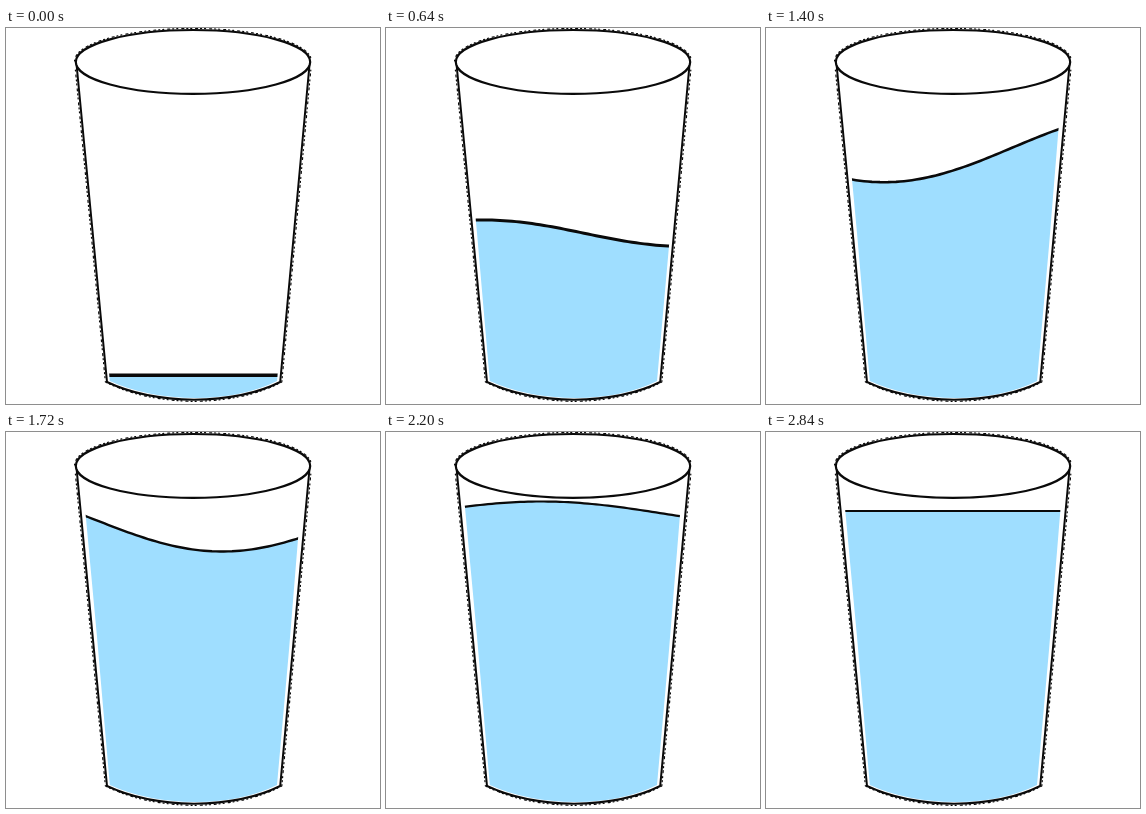
Write an HTML page that moves like this. It is 374 by 376 pixels and loops after 2880 ms.

```html
<!DOCTYPE html>
<html lang="en">
<head>
<meta charset="utf-8">
<title>Filling glass</title>
<style>
  html, body { margin: 0; width: 100%; height: 100%; overflow: hidden; background: #fff; }
  svg { display: block; width: 100%; height: 100%; }
  .ink { fill: none; stroke: #0a0a0a; stroke-linecap: round; stroke-linejoin: round; }
</style>
</head>
<body>
<svg viewBox="0 0 374 376">
  <clipPath id="inside">
    <path d="M75 32 L79.3 79 L91 205 L103.8 353 Q140 369.5 190 370 Q238 369.5 271 353 L283 218 L294.3 79 L298 32 Z"/>
  </clipPath>
  <g clip-path="url(#inside)">
    <path id="water" fill="#9fdeff"/>
    <path id="surface" class="ink"/>
  </g>
  <g class="ink" stroke-width="2">
    <ellipse cx="187" cy="33.9" rx="117.2" ry="31.9" stroke-width="2.2"/>
    <path d="M70.7 38 L101 354 Q137 371 188 371.8 Q240 371 274.2 354 L303.4 38"/>
  </g>
  <g class="ink" stroke-width="1.2" stroke-dasharray="1 4 2 3 1 3">
    <path d="M69.4 42 L99.4 354 Q136 372.5 188 373.4 Q241 372.5 275.8 354 L304.8 42"/>
    <path d="M68.6 33 A118.4 32.6 0 0 1 305.4 33"/>
  </g>
</svg>
<script>
  const DURATION = 2880, STEP = 40;
  const times = [0, 640, 920, 1400, 1720, 2200, 2840];
  const tracks = {
    level:  [347.3, 205.2, 151.8, 120, 88.5, 82, 79],
    height: [0, 13.2, 24.8, 34.2, 31, 12.5, 0],
    crest:  [-100, 98, 184, 373, 466, 655, 890],
    length: [380, 400, 440, 510, 500, 500, 500],
    weight: [3.4, 3, 2.7, 2.6, 2.4, 2.2, 2]
  };

  // Monotone cubic interpolation through the track's values
  function curve(values) {
    const last = times.length - 1;
    const slopes = times.slice(1).map((t, i) => (values[i + 1] - values[i]) / (t - times[i]));
    const tangents = times.map((_, i) => {
      if (i === 0) return slopes[0];
      if (i === last) return 0;
      const a = slopes[i - 1], b = slopes[i];
      return a * b > 0 ? 2 * a * b / (a + b) : 0;
    });
    return t => {
      let i = 0;
      while (i < last - 1 && t > times[i + 1]) i++;
      const span = times[i + 1] - times[i];
      const u = (t - times[i]) / span, v = 1 - u;
      return v * v * (1 + 2 * u) * values[i] + u * u * (3 - 2 * u) * values[i + 1]
        + span * u * v * (v * tangents[i] - u * tangents[i + 1]);
    };
  }

  const level = curve(tracks.level);
  const height = curve(tracks.height);
  const crest = curve(tracks.crest);
  const waveLength = curve(tracks.length);
  const weight = curve(tracks.weight);
  const water = document.getElementById('water');
  const surface = document.getElementById('surface');

  function draw(t) {
    const y0 = level(t), a = height(t), peak = crest(t);
    const k = 2 * Math.PI / waveLength(t);
    const points = [];
    for (let x = 70; x <= 306; x += 4) {
      const y = y0 - a * Math.cos((x - peak) * k);
      points.push(x + ' ' + y.toFixed(2));
    }
    const line = 'M' + points.join(' L');
    surface.setAttribute('d', line);
    surface.setAttribute('stroke-width', weight(t));
    water.setAttribute('d', line + ' V376 H70 Z');
  }

  const start = performance.now();
  function tick() {
    const t = (performance.now() - start) % DURATION;
    draw(Math.floor(t / STEP) * STEP);
    requestAnimationFrame(tick);
  }
  tick();
</script>
</body>
</html>
```
